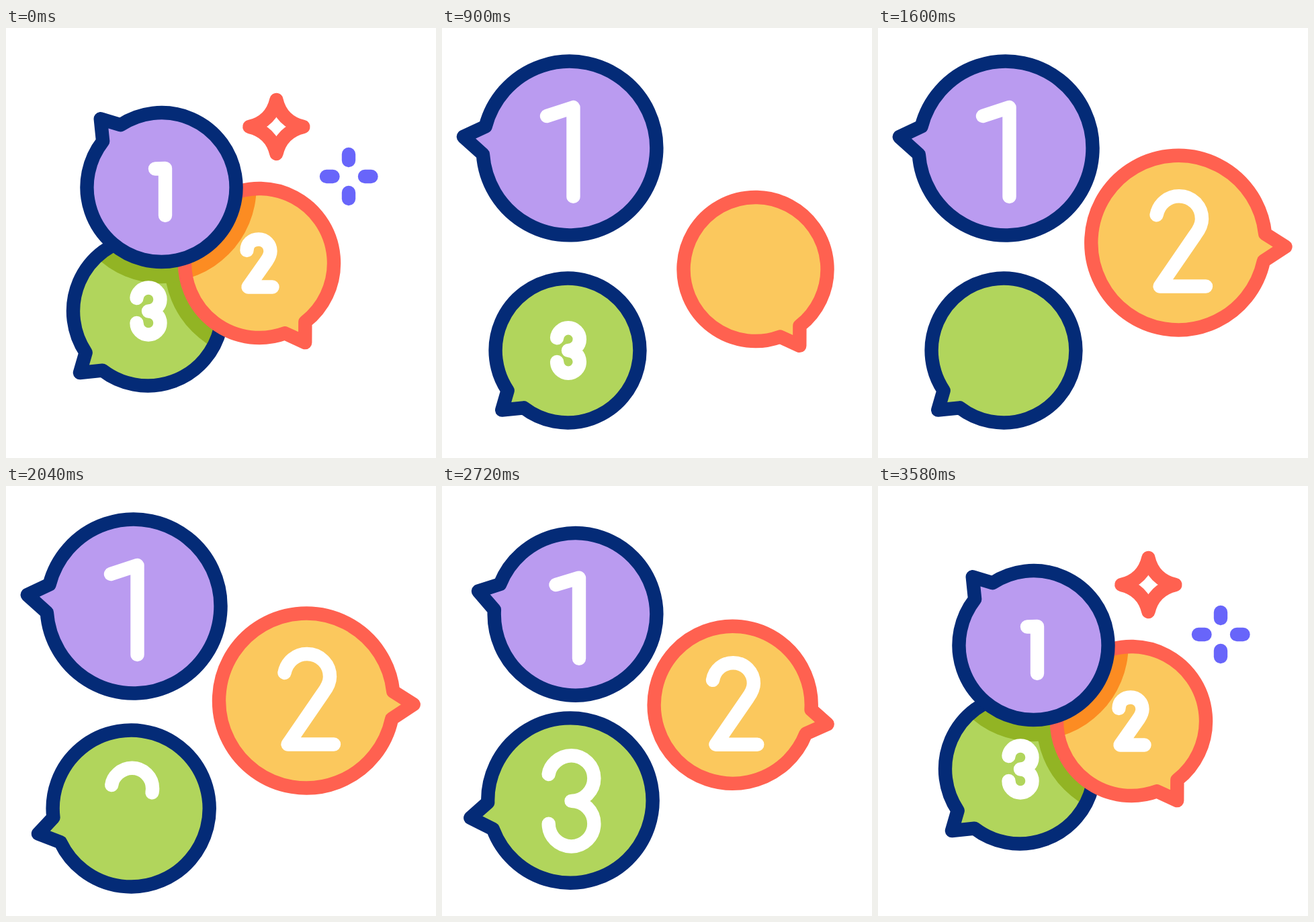
An HTML page for the animation above (3600 ms loop, 640 by 640 pixels).

```html
<!DOCTYPE html>
<html lang="en">
<head>
<meta charset="utf-8">
<title>One, two, three</title>
<style>
  html, body { margin: 0; width: 100%; height: 100%; overflow: hidden; background: #fff; }
  svg { display: block; width: 100%; height: 100%; }
  .line { fill: none; stroke-width: 20.4; stroke-linecap: round; stroke-linejoin: round; }
</style>
</head>
<body>
<svg id="stage" viewBox="0 0 640 640">
  <g id="star" class="line" stroke="#ff6150">
    <path d="M0-40C5-18.5 18.5-5 40 0C18.5 5 5 18.5 0 40C-5 18.5-18.5 5-40 0C-18.5-5-5-18.5 0-40Z"/>
  </g>
  <path id="spark" class="line" stroke="#6865fa"
    d="M510 188v9M510 245v9M477 221h9.5M534 221h9.5"/>
</svg>
<script>
const LOOP = 3600, SPREAD = 367, GROW = 533, BACK = 2567, BACK_LEN = 667;
const NAVY = '#042b77', CORAL = '#ff6150';
const NS = 'http://www.w3.org/2000/svg';
const stage = document.getElementById('stage');
const star = document.getElementById('star');
const spark = document.getElementById('spark');

// Eased progress, same curve as cubic-bezier(1/3, 0, 1/3, 1)
function ease(t, start, length) {
  const x = (t - start) / length;
  if (x <= 0) return 0;
  if (x >= 1) return 1;
  let lo = 0, hi = 1;
  for (let i = 0; i < 24; i++) {
    const s = (lo + hi) / 2;
    if (s - s * s + s * s * s < x) lo = s; else hi = s;
  }
  return lo * lo * (3 - 2 * lo);
}

const mix = (a, b, p) => a.map((v, i) => v + (b[i] - v) * p);

function add(parent, tag, attrs) {
  const el = document.createElementNS(NS, tag);
  for (const k in attrs) el.setAttribute(k, attrs[k]);
  return parent.appendChild(el);
}

// Bubble pose: centre plus a vector that holds radius and tail direction
function pose(cx, cy, r, deg) {
  const a = deg * Math.PI / 180;
  return [cx, cy, r * Math.cos(a), r * Math.sin(a)];
}

function bubblePath([cx, cy, zx, zy], [from, to]) {
  const r = Math.hypot(zx, zy), dir = Math.atan2(zy, zx);
  const at = (deg, k) => {
    const a = dir + deg * Math.PI / 180;
    return `${cx + k * r * Math.cos(a)} ${cy + k * r * Math.sin(a)}`;
  };
  return `M${at(to, 1)}A${r} ${r} 0 1 1 ${at(from, 1)}L${at(0, 1.229)}Z`;
}

// Points of a "3": two bowls of radius r that meet at (x, y)
function three(x, y, r, lift) {
  const k = r * 0.5523, R = x + r, L = x - r, up = y - r, low = y + r;
  return [
    L, up - lift, L + lift / 4, up - k, x - k, y - 2 * r, x, y - 2 * r,
    x + k, y - 2 * r, R, up - k, R, up,
    R, up + k, x + k, y, x, y,
    x + k, y, R, low - k, R, low,
    R, low + k, x + k, y + 2 * r, x, y + 2 * r,
    x - k, y + 2 * r, L, low + k, L, low
  ];
}

const PAIR = '# # ', CURVE = 'C' + PAIR.repeat(3);

const bubbles = [
  {
    fill: '#b1d55c', line: NAVY, shade: '#92b424', tail: [-10.4, 8.5],
    home: pose(211, 421.5, 111, 137.8), apart: pose(187, 480, 107.4, 137.8), big: pose(185.7, 480, 131, 176.8),
    glyph: 'M' + PAIR + CURVE.repeat(6),
    small: three(212, 421.5, 17.5, 2), large: three(187.5, 481, 38, 7),
    fade: 1100, grow: 1800
  },
  {
    fill: '#fbc85d', line: CORAL, shade: '#fc8c22', tail: [-8, 10],
    home: pose(377, 350, 111, 60), apart: pose(466.5, 359, 107, 60), big: pose(447, 319.5, 130, 2),
    glyph: 'M' + PAIR + CURVE.repeat(3) + 'L# # L# #',
    small: [358.5, 331, 358.5, 321, 366, 314.5, 376, 314.5, 386, 314.5, 393.5, 322.5, 393.5, 332,
      393.5, 338, 391, 342, 388, 346.5, 360.5, 385.5, 396.5, 385.5],
    large: [414.5, 278, 418, 261, 432, 250, 448, 250, 467, 250, 482, 265, 482, 284,
      482, 293, 478, 300, 472, 308, 419.5, 384.5, 488, 384.5],
    fade: 400, grow: 1100
  },
  {
    fill: '#ba9bf0', line: NAVY, tail: [-10.2, 8.4],
    home: pose(231.5, 237, 111, 228.3), apart: pose(175.7, 177, 107, 228.3), big: pose(190, 179, 129.5, 186.1),
    glyph: 'M# # L# # L# #',
    small: [222, 209.5, 237, 209, 237, 279], large: [156, 131, 195.5, 118, 195.5, 251],
    fade: 0, grow: 400
  }
];

bubbles.forEach((b, i) => {
  // Digit shape while the bubbles are apart: the small one, shrunk with its bubble
  b.mid = b.small.map((v, j) => b.apart[j % 2] + 0.963 * (v - b.home[j % 2]));
  const clip = add(stage, 'clipPath', { id: 'clip' + i });
  b.mask = add(clip, 'path', {});
  b.body = add(stage, 'path', { fill: b.fill });
  const shades = add(stage, 'g', { fill: b.shade || 'none', 'clip-path': `url(#clip${i})` });
  b.shades = bubbles.slice(i + 1).map(over => ({ over, el: add(shades, 'circle', {}) }));
  b.edge = add(stage, 'path', { class: 'line', stroke: b.line });
  b.digit = add(stage, 'path', { class: 'line', stroke: '#fff', pathLength: 1 });
});

function draw(t) {
  const spread = ease(t, 0, SPREAD), back = ease(t, BACK, BACK_LEN);
  const near = 1 - spread + back;

  for (const b of bubbles) {
    const grow = ease(t, b.grow, GROW);
    const morph = (a, m, c) => mix(mix(mix(a, m, spread), c, grow), a, back);
    b.now = morph(b.home, b.apart, b.big);
    const d = bubblePath(b.now, b.tail);
    for (const el of [b.mask, b.body, b.edge]) el.setAttribute('d', d);

    const pts = morph(b.small, b.mid, b.large);
    let n = 0;
    b.digit.setAttribute('d', b.glyph.replace(/#/g, () => pts[n++].toFixed(2)));
    const write = ease(t, b.grow + 130, 370);
    const writing = write > 0 && write < 1;
    b.digit.setAttribute('stroke-dasharray', writing ? `${write} 2` : 'none');
    b.digit.setAttribute('opacity', write > 0 ? 1 : 1 - ease(t, b.fade, SPREAD));
  }

  for (const b of bubbles) {
    for (const { over, el } of b.shades) {
      const [x, y, zx, zy] = over.now;
      el.setAttribute('cx', x);
      el.setAttribute('cy', y + (b === bubbles[0] ? 2 * near : 0));
      el.setAttribute('r', Math.hypot(zx, zy) + 10.2 + 20 * near);
    }
  }

  const beat = Math.min(1, Math.max(0, (t - 3120) / 460));
  const scale = 1 + 0.38 * Math.sin(Math.PI * beat) ** 2;
  star.setAttribute('transform', `translate(402.4 147) scale(${scale})`);
  star.setAttribute('opacity', 1 - ease(t, 85, SPREAD) + ease(t, 2870, 400));
  spark.setAttribute('opacity', 1 - ease(t, 0, SPREAD) + ease(t, 2960, 400));
}

const begin = performance.now();
function tick() {
  draw((performance.now() - begin) % LOOP);
  requestAnimationFrame(tick);
}
tick();
</script>
</body>
</html>
```
